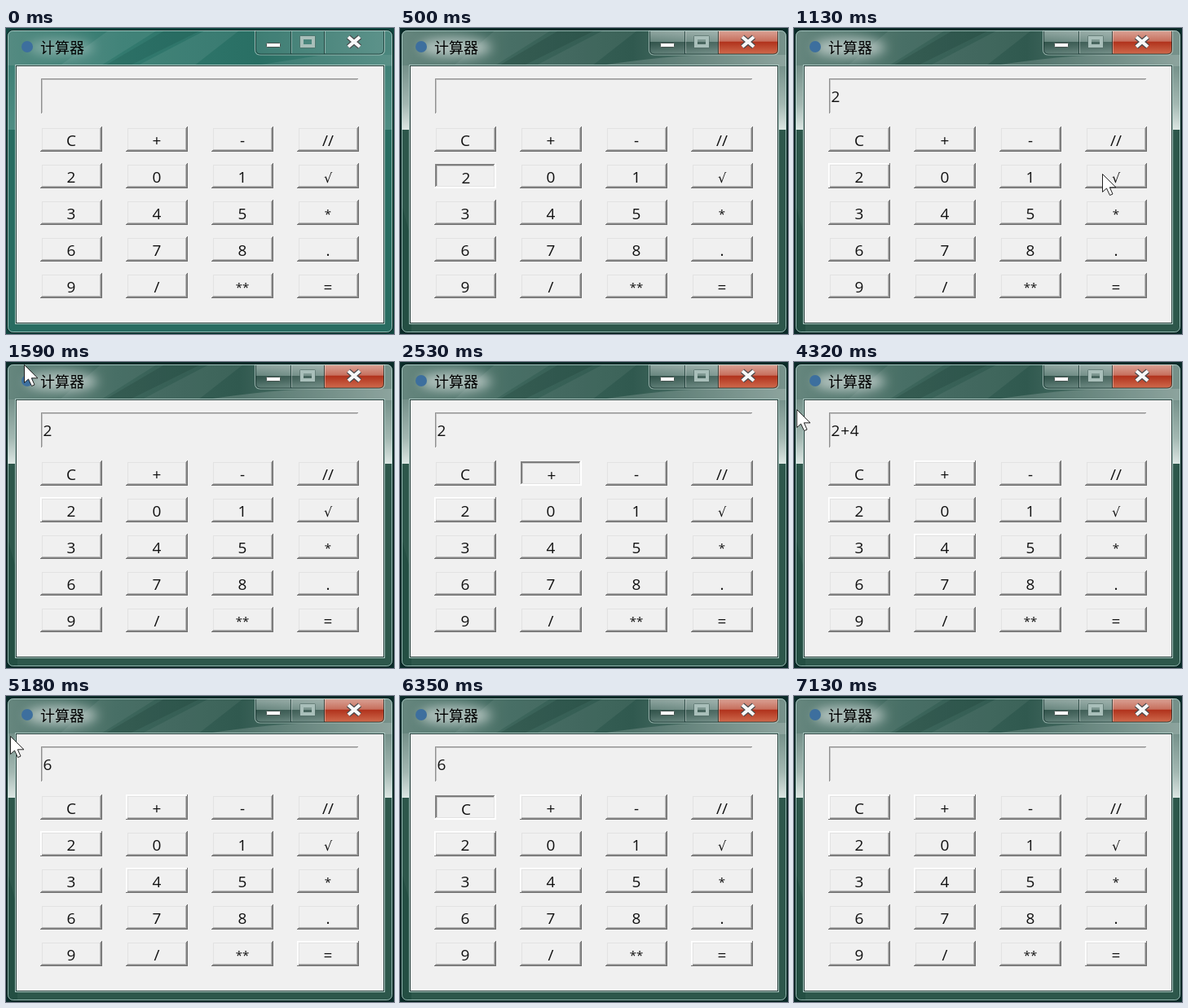
Recreate the animation shown at these times as an HTML page. Size 476x376 px, loop 7.99 s.

```html
<!DOCTYPE html>
<html lang="zh">
<head>
<meta charset="utf-8">
<title>计算器</title>
<style>
  html, body { margin: 0; width: 100%; height: 100%; overflow: hidden; background: #0b2e2b; }
  svg { display: block; width: 476px; height: 376px; }
  text { font: 19px "Open Sans", "Noto Sans", sans-serif; fill: #111; white-space: pre; }
  .title { font: 18px "Noto Sans CJK SC", "Noto Sans CJK", sans-serif; fill: #000; }
  .star { font-size: 15px; }
  .root { font: 16px "DejaVu Sans", sans-serif; }
  .crisp { shape-rendering: crispEdges; }
  #display { letter-spacing: .8px; }
</style>
</head>
<body>
<svg viewBox="0 0 476 376">
  <defs>
    <clipPath id="shell"><rect x="2" y="3" width="472" height="371" rx="7"/></clipPath>
    <filter id="soft" x="-40%" y="-80%" width="180%" height="260%"><feGaussianBlur stdDeviation="7"/></filter>
    <linearGradient id="idleBar">
      <stop offset="0" stop-color="#558b82"/><stop offset=".3" stop-color="#337a6f"/>
      <stop offset=".65" stop-color="#296f64"/><stop offset="1" stop-color="#4c877e"/>
    </linearGradient>
    <linearGradient id="idleSide" x2="0" y2="1">
      <stop offset="0" stop-color="#3f8076"/><stop offset="1" stop-color="#4f8d83"/>
    </linearGradient>
    <linearGradient id="activeBar">
      <stop offset="0" stop-color="#67877f"/><stop offset=".28" stop-color="#3d665c"/>
      <stop offset=".6" stop-color="#30594f"/><stop offset="1" stop-color="#78938c"/>
    </linearGradient>
    <linearGradient id="activeSide" x2="0" y2="1">
      <stop offset="0" stop-color="#75918a"/><stop offset=".6" stop-color="#a3b8b2"/>
      <stop offset="1" stop-color="#dce6e3"/>
    </linearGradient>
    <linearGradient id="glass" x2="0" y2="1">
      <stop offset="0" stop-color="#fff" stop-opacity=".45"/><stop offset=".47" stop-color="#fff" stop-opacity=".24"/>
      <stop offset=".48" stop-color="#000" stop-opacity=".14"/><stop offset="1" stop-color="#fff" stop-opacity=".2"/>
    </linearGradient>
    <linearGradient id="red" x2="0" y2="1">
      <stop offset="0" stop-color="#dba497"/><stop offset=".46" stop-color="#c76f5d"/>
      <stop offset=".48" stop-color="#b0311b"/><stop offset="1" stop-color="#cf6a4d"/>
    </linearGradient>
  </defs>

  <g id="idle">
    <rect width="476" height="376" fill="#104640"/>
    <g clip-path="url(#shell)">
      <rect width="476" height="376" fill="#286c61"/>
      <rect width="476" height="47" fill="url(#idleBar)"/>
      <rect y="46" width="476" height="79" fill="url(#idleSide)"/>
      <path d="M130 0h60l-75 47h-50zM250 0h40l-60 47h-70z" fill="#fff" opacity=".07"/>
      <path d="M200 0h45l-95 47h-30z" fill="#00362f" opacity=".14"/>
      <path d="M300 47l90-14h86v14z" fill="#fff" opacity=".08"/>
    </g>
    <ellipse cx="68" cy="24" rx="40" ry="10" fill="#fff" opacity=".32" filter="url(#soft)"/>
    <path d="M306 3h158v24q0 5-5 5H311q-5 0-5-5z" fill="#fff" opacity=".1"/>
  </g>

  <g id="active">
    <rect width="476" height="376" fill="#0a2b29"/>
    <g clip-path="url(#shell)">
      <rect width="476" height="376" fill="#2d574b"/>
      <rect width="476" height="47" fill="url(#activeBar)"/>
      <rect y="46" width="476" height="79" fill="url(#activeSide)"/>
      <path d="M120 0h70l-75 47h-50zM255 0h40l-60 47h-70z" fill="#fff" opacity=".06"/>
      <path d="M200 0h45l-95 47h-30z" fill="#001f1a" opacity=".14"/>
      <path d="M240 47q90-14 150-14h86v14z" fill="#fff" opacity=".16"/>
      <path d="M0 210l14 50v116H0z" fill="#003026" opacity=".2"/>
    </g>
    <ellipse cx="68" cy="24" rx="44" ry="12" fill="#fff" opacity=".55" filter="url(#soft)"/>
    <path d="M306 3h84v29h-79q-5 0-5-5z" fill="url(#glass)"/>
    <path d="M390 3h74v24q0 5-5 5h-69z" fill="url(#red)"/>
  </g>

  <g fill="none">
    <rect x="1.5" y="2.5" width="473" height="372" rx="7" stroke="#0a2422"/>
    <rect x="2.5" y="3.5" width="471" height="370" rx="6" stroke="#b9dad4" stroke-opacity=".75"/>
    <path d="M305.5 3v24q0 6 6 6h147q6 0 6-6V3" stroke="#cfe2de" stroke-opacity=".65"/>
    <path d="M306.5 4v22q0 6 6 6h145q6 0 6-6V4M349.5 4v28M390.5 4v28" stroke="#16332f" stroke-opacity=".75"/>
    <path d="M350.5 4v27M391.5 4v27" stroke="#fff" stroke-opacity=".35"/>
    <rect x="363" y="12" width="14" height="10" stroke="#a9bfba" stroke-width="4"/>
    <rect x="360.5" y="9.5" width="19" height="15" rx="1" stroke="#526c66" stroke-opacity=".6"/>
    <path d="M420 11l14 12m0-12l-14 12" stroke="#4a4b4d" stroke-width="6.5"/>
    <path d="M420 11l14 12m0-12l-14 12" stroke="#f7f8f8" stroke-width="4.2"/>
  </g>
  <rect x="319.5" y="18.5" width="17" height="5" rx="1" fill="#fff" stroke="#46534f"/>
  <circle cx="26" cy="23" r="7" fill="#3d6f9e"/>
  <text class="title" x="42" y="31">计算器</text>

  <g class="crisp">
    <rect x="11" y="45" width="454" height="319" fill="#a9c6c0"/>
    <rect x="12" y="46" width="452" height="317" fill="#263f3b"/>
    <rect x="13" y="47" width="450" height="315" fill="#f0f0f0"/>
    <path d="M43 62h389v1H44v42h-1z" fill="#8f8f8f"/>
    <path d="M44 63h387v1H45v40h-1z" fill="#c4c4c4"/>
  </g>
  <text id="display" x="45.5" y="91"></text>
  <g id="keys"></g>
  <rect id="speck" class="crisp" x="198" y="212" width="8" height="1" fill="#fff"/>
  <path id="cursor" d="M.5.5V22.5L5.5 18 9.5 26.5 13 25 9.3 16.8H17z" fill="#fff" stroke="#222" stroke-linejoin="round"/>
</svg>

<script>
const LOOP = 7990;
const LABELS = ['C', '+', '-', '//', '2', '0', '1', '√', '3', '4', '5', '*',
                '6', '7', '8', '.', '9', '/', '**', '='];
const $ = id => document.getElementById(id);

// key, press time, release time, display after release
const PRESSES = [
  ['2', 500, 660, '2'],
  ['+', 2530, 2700, '2+'],
  ['4', 3700, 3770, '2+4'],
  ['=', 4780, 4860, '6'],
  ['C', 6350, 6500, '']
];

// time, then pointer tip; no tip means hidden
const POINTER = [
  [0], [730, 101, 177], [810],
  [1130, 378, 179], [1210],
  [1360, 396, 224], [1440], [1510, 18, 8], [1590, 22, 3], [1680, 20, 5], [1750],
  [3160, 199, 207], [3240],
  [4320, 3, 58], [4400, 10, 56], [4470, 18, 55], [4550],
  [4780, 1, 37], [4860, 18, 55], [5180, 5, 49], [5250],
  [5480, 101, 164], [5570, 106, 171], [5650, 110, 178], [5740],
  [7040, 141, 197], [7130]
];

const topLeft = (i, color) =>
  `<path d="M${i} ${i}H${76 - i}v1H${i + 1}V${31 - i}H${i}z" fill="${color}"/>`;
const bottomRight = (i, color) =>
  `<path d="M${76 - i} ${i}V${31 - i}H${i}v-1H${75 - i}V${i}z" fill="${color}"/>`;

const raised = edge => topLeft(0, edge) + topLeft(2, '#e2e2e2') +
  bottomRight(0, '#727272') + bottomRight(1, '#868686') + bottomRight(2, '#b8b8b8');
const BEVELS = {
  fresh: raised('#f0f0f0'),
  used: raised('#fff') + topLeft(1, '#fafafa'),
  down: topLeft(1, '#858585') + topLeft(2, '#777') + topLeft(3, '#c8c8c8') +
    bottomRight(0, '#fff') + bottomRight(1, '#fff') + bottomRight(2, '#e3e3e3')
};

function makeKey(label, i) {
  const g = document.createElementNS('http://www.w3.org/2000/svg', 'g');
  const style = label[0] === '*' ? 'star' : label === '√' ? 'root' : '';
  g.setAttribute('transform', `translate(${42 + i % 4 * 105} ${121 + (i >> 2) * 45})`);
  g.innerHTML = `<g class="crisp"></g>
    <text class="${style}" x="38" y="${style === 'star' ? 22.5 : 24}" text-anchor="middle">${label}</text>`;
  $('keys').append(g);
  const [bevel, text] = g.children;
  let shown;
  return state => {
    if (state === shown) return;
    shown = state;
    bevel.innerHTML = BEVELS[state];
    text.setAttribute('transform', state === 'down' ? 'translate(1 1)' : '');
  };
}
const keys = LABELS.map(makeKey);
const show = (id, on) => { $(id).style.display = on ? '' : 'none'; };

function draw(t) {
  show('idle', t < 500);
  show('active', t >= 500);
  show('speck', t >= 3240 && t < 3700);

  LABELS.forEach((label, i) => {
    const press = PRESSES.find(p => p[0] === label);
    const state = !press || t < press[1] ? 'fresh' : t < press[2] ? 'down' : 'used';
    keys[i](state);
  });
  const done = PRESSES.filter(p => t >= p[2]).pop();
  $('display').textContent = done ? done[3] : '';

  const [, x, y] = POINTER.filter(p => t >= p[0]).pop();
  show('cursor', x !== undefined);
  if (x !== undefined) $('cursor').setAttribute('transform', `translate(${x} ${y})`);
}

const start = performance.now();
function tick() {
  draw((performance.now() - start) % LOOP);
  requestAnimationFrame(tick);
}
tick();
</script>
</body>
</html>
```
